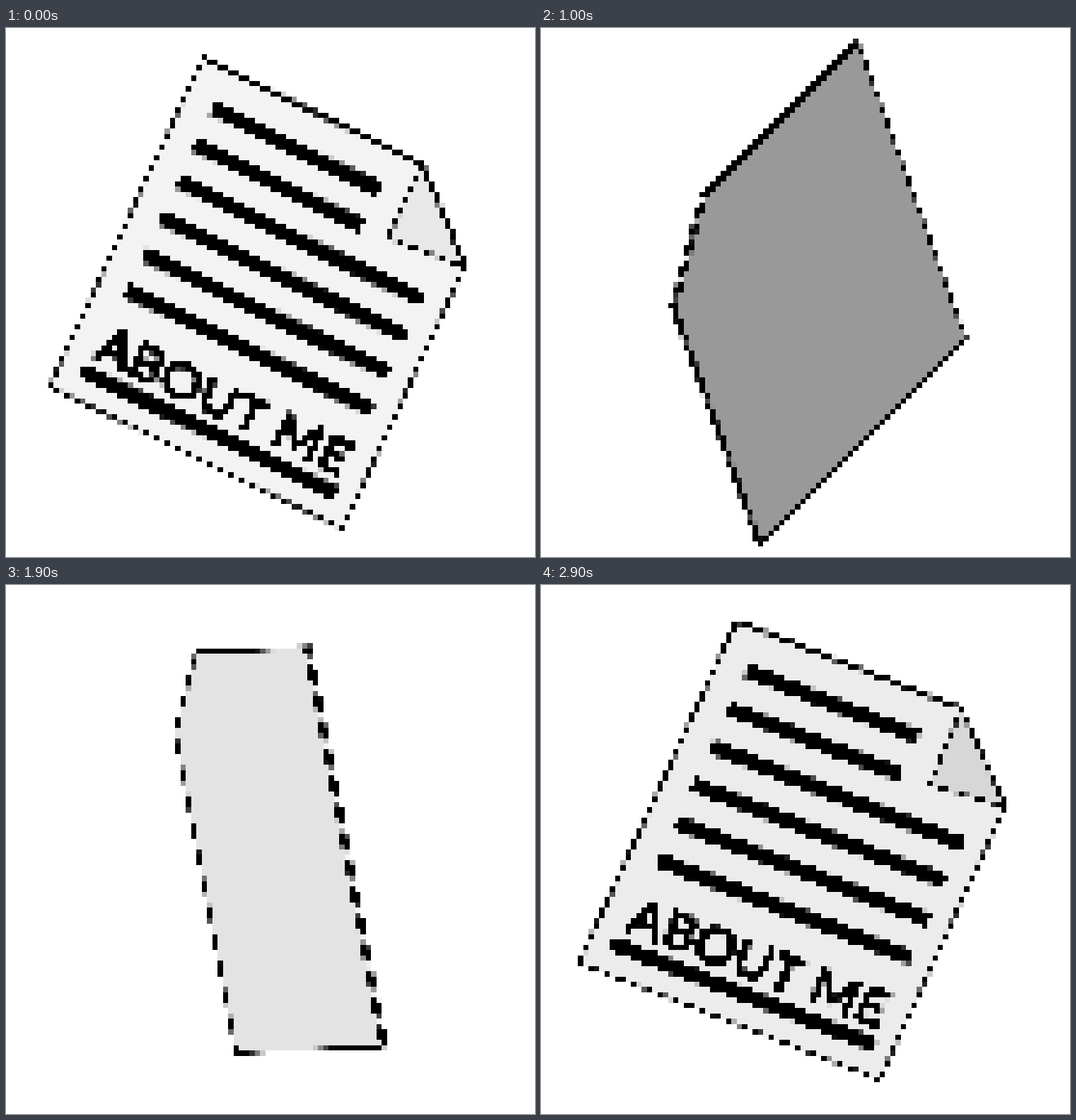
These frames come from a looping animation (748x748 px, 3000 ms). An HTML page with a canvas:

```html
<!DOCTYPE html>
<html lang="en">
<head>
<meta charset="utf-8">
<title>Spinning page</title>
<style>
  html, body { margin: 0; width: 100%; height: 100%; overflow: hidden; background: #fff; }
  canvas { display: block; width: 748px; height: 748px; image-rendering: pixelated; }
</style>
</head>
<body>
<canvas id="stage" width="100" height="100"></canvas>
<script>
const STAGE = 748, CELLS = 100, FINE = 800;
const STEPS = 30, STEP_MS = 100;
const RAD = Math.PI / 180;
const ROLL = 22.7 * RAD, START = 13;      // tilt in the page plane, first yaw in degrees
const PITCH_SIN = 0.415, PITCH_COS = 0.91;
const HALF_DEPTH = 3.5, RELIEF = 13, LINE = 4;
const PAGE = [[-230, -288], [115, -288], [230, -173], [230, 288], [-230, 288]];
const FOLD = [[115, -288, HALF_DEPTH], [115, -173, 27], [230, -173, HALF_DEPTH]];

const view = document.getElementById('stage').getContext('2d');
const fine = document.createElement('canvas');
fine.width = fine.height = FINE;
const ctx = fine.getContext('2d');
view.imageSmoothingEnabled = false;

let sin = 0, cos = 1;

function resetSpace() {
  const k = FINE / STAGE;
  ctx.setTransform(k, 0, 0, k, 0, 0);
}

// Page plane at the given depth, as an affine map onto the stage
function enterPlane(depth) {
  resetSpace();
  ctx.transform(cos, PITCH_SIN * sin, 0, PITCH_COS,
    377 - depth * sin, 374 + PITCH_SIN * depth * cos);
  ctx.rotate(ROLL);
}

function trace(points) {
  ctx.beginPath();
  for (const [x, y, depth] of points) {
    enterPlane(depth);
    ctx.lineTo(x, y);
  }
  ctx.closePath();
  resetSpace();
}

function fill(points, color) {
  trace(points);
  ctx.fillStyle = color;
  ctx.fill();
}

function outline(points) {
  trace(points);
  ctx.strokeStyle = '#000';
  ctx.lineWidth = LINE;
  ctx.stroke();
}

// Lambert light plus ambient, converted from linear to sRGB
function shade(yaw, peak, strength) {
  const lit = 0.0685 + strength * Math.max(0, Math.cos((yaw - peak) * RAD));
  const v = Math.round(255 * Math.min(1, 1.055 * lit ** (1 / 2.4) - 0.055));
  return `rgb(${v},${v},${v})`;
}

function drawBody(color, front) {
  const near = front ? HALF_DEPTH : -HALF_DEPTH;
  const face = depth => PAGE.map(([x, y]) => [x, y, depth]);
  const nearFace = face(near), farFace = face(-near);
  PAGE.forEach((_, i) => {
    const j = (i + 1) % PAGE.length;
    fill([nearFace[i], nearFace[j], farFace[j], farFace[i]], '#f4f4f4');
  });
  outline(farFace);
  fill(nearFace, color);
  outline(nearFace);
}

// Raised bars and lettering, swept through their depth
function drawRelief() {
  for (let depth = HALF_DEPTH; depth <= RELIEF; depth += 1.5) {
    enterPlane(depth);
    ctx.fillStyle = ctx.strokeStyle = '#000';
    for (let i = 0; i < 6; i++) {
      ctx.fillRect(-189, -236 + 64.2 * i, i < 2 ? 263 : 386, 19);
    }
    ctx.fillRect(-200, 230, 403, 19);
    ctx.font = '75px Lato, sans-serif';
    ctx.lineWidth = 2.5;
    ctx.fillText('ABOUT ME', -193, 212);
    ctx.strokeText('ABOUT ME', -193, 212);
  }
}

function drawFold(color) {
  fill(FOLD, color);
  outline(FOLD);
}

function render(step) {
  const yaw = START + step * 360 / STEPS;
  sin = Math.sin(yaw * RAD);
  cos = Math.cos(yaw * RAD);
  const front = cos > 0;

  resetSpace();
  ctx.fillStyle = '#fff';
  ctx.fillRect(0, 0, STAGE, STAGE);
  const body = () => drawBody(shade(front ? yaw : yaw + 180, 26, 0.85), front);
  if (front) body();
  drawRelief();
  drawFold(shade(yaw, 48, 0.9));
  if (!front) body();

  view.drawImage(fine, 0, 0, CELLS, CELLS);
}

const begin = performance.now();
let shown = -1;
function tick() {
  const step = Math.floor((performance.now() - begin) / STEP_MS) % STEPS;
  if (step !== shown) render(shown = step);
  requestAnimationFrame(tick);
}
tick();
</script>
</body>
</html>
```
